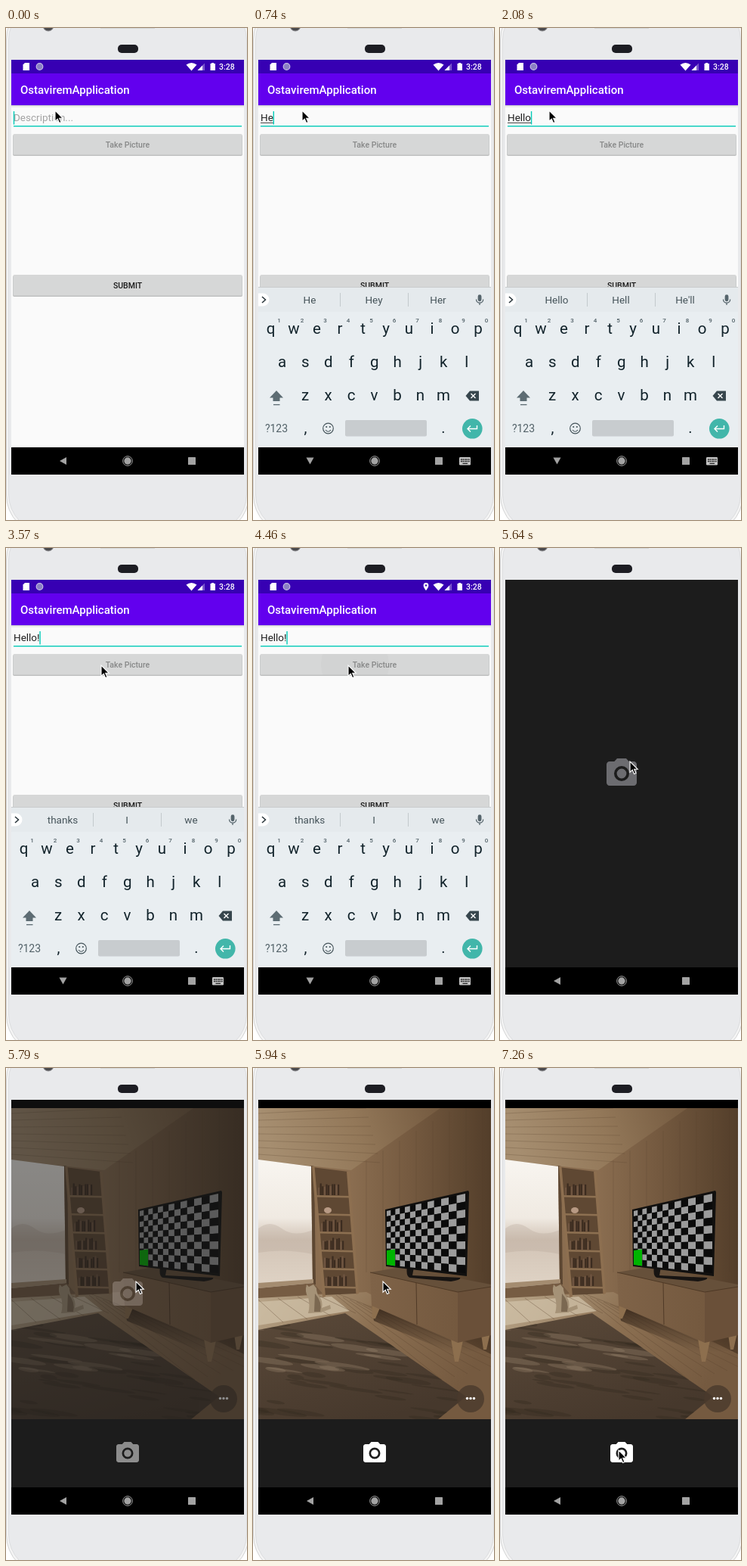
These frames come from a looping animation (319 by 650 pixels, 8000 ms). An HTML page:

```html
<!DOCTYPE html>
<html lang="en">
<head>
<meta charset="utf-8">
<title>Phone demo</title>
<style>
html, body { margin: 0; width: 100%; height: 100%; overflow: hidden; background: #fff; }
svg { display: block; width: 100%; height: 100%; }
text { font-family: Roboto, sans-serif; }
.mid { text-anchor: middle; }
.med { font-weight: 500; }
</style>
</head>
<body>
<svg viewBox="0 0 319 650" xmlns="http://www.w3.org/2000/svg">
<defs>
  <path id="camera" fill-rule="evenodd" d="M9 2L7.17 4H4c-1.1 0-2 .9-2 2v12c0 1.1.9 2 2 2h16c1.1 0 2-.9 2-2V6c0-1.1-.9-2-2-2h-3.17L15 2zM12 7a5 5 0 1 1 0 10a5 5 0 1 1 0-10zM12 8.8a3.2 3.2 0 1 0 0 6.4a3.2 3.2 0 1 0 0-6.4z"/>
  <clipPath id="screen"><rect x="7" y="42" width="308" height="512"/></clipPath>
  <clipPath id="view"><rect x="7" y="53" width="308" height="411"/></clipPath>
  <clipPath id="rugClip"><path d="M7 346L122 324L282 434L245 464H7z"/></clipPath>
  <clipPath id="btnClip"><rect x="9.5" y="140" width="303" height="27.5"/></clipPath>
  <linearGradient id="wall"><stop offset=".4" stop-color="#8a6d50"/><stop offset=".65" stop-color="#755a40"/><stop offset="1" stop-color="#533e2a"/></linearGradient>
  <linearGradient id="ceil" x2="1" y2="-.1"><stop offset="0" stop-color="#a68e70"/><stop offset=".5" stop-color="#937859"/><stop offset="1" stop-color="#73593f"/></linearGradient>
  <linearGradient id="sky" x2="0" y2="1"><stop offset="0" stop-color="#f8f5f0"/><stop offset=".45" stop-color="#f0eae2"/><stop offset=".62" stop-color="#d2c4b6"/><stop offset="1" stop-color="#e0d4c6"/></linearGradient>
  <linearGradient id="floor" x2="1" y2=".4"><stop offset="0" stop-color="#b9a68a"/><stop offset=".5" stop-color="#8c7052"/><stop offset="1" stop-color="#755a40"/></linearGradient>
  <linearGradient id="rugFill" x2=".6" y2="1"><stop offset="0" stop-color="#5a4939"/><stop offset="1" stop-color="#46382c"/></linearGradient>
  <linearGradient id="front"><stop offset="0" stop-color="#7f6348"/><stop offset="1" stop-color="#74593f"/></linearGradient>
  <linearGradient id="shadow" x2="0" y2="1"><stop offset="0" stop-color="#3a2a1d"/><stop offset="1" stop-color="#3a2a1d" stop-opacity="0"/></linearGradient>
</defs>

<rect width="319" height="650" fill="#fff"/>
<rect x=".5" y="-37" width="321" height="706" rx="52" fill="#f4f4f4" stroke="#d2d3d4"/>
<rect x="3.5" y="-34" width="315" height="700" rx="50" fill="#e9eaec" stroke="#dcdddf"/>
<circle cx="56" cy="-3" r="7" fill="#4a4a4d" stroke="#8c8c90"/>
<rect x="125" y="-3" width="72" height="4" fill="#d3d5d6"/>
<rect x="148" y="22" width="27" height="11" rx="5" fill="#1d1d23"/>

<g id="app">
  <rect x="7" y="42" width="308" height="512" fill="#fafafa"/>
  <rect x="7" y="102" width="308" height="1.5" fill="#d0d0d2"/>
  <rect x="7" y="103.5" width="308" height="1.5" fill="#efeff0"/>
  <rect x="7" y="60" width="308" height="42" fill="#6200ee"/>
  <rect x="7" y="42" width="308" height="18" fill="#3700b3"/>
  <text class="med" x="19" y="87" font-size="15" fill="#fff">OstaviremApplication</text>
  <rect x="10" y="129" width="302" height="1.4" fill="#03cbb8"/>
  <text id="field" x="10" y="123.4" font-size="13.5"></text>
  <rect id="under" x="10" y="124.8" height=".9" fill="#222"/>
  <rect id="caret" y="110" width="1.4" height="17.5" fill="#03cbb8"/>
  <g id="buttons"></g>
  <circle id="ripple" cx="135" cy="154" r="45" fill="#000" opacity=".02" clip-path="url(#btnClip)"/>
  <text class="mid med" x="161" y="157.6" font-size="10.5" fill="#878888">Take Picture</text>
  <text class="mid med" x="161" y="343.6" font-size="10.5" fill="#1b1b1b">SUBMIT</text>
</g>

<g id="camApp" clip-path="url(#screen)">
  <g id="preview">
    <rect x="7" y="42" width="308" height="512" fill="#000"/>
    <g clip-path="url(#view)">
      <rect x="7" y="53" width="308" height="411" fill="url(#wall)"/>
      <path d="M7 53H248L130 135L7 122z" fill="url(#ceil)"/>
      <g id="planks" stroke="#553f2b" stroke-width=".7" opacity=".35"></g>
      <path d="M7 121L77 130L79 285L7 292z" fill="url(#sky)"/>
      <path d="M7 212Q22 200 38 212T79 214V246Q42 238 7 244z" fill="#b3a496" opacity=".3"/>
      <path d="M77 129L81 130L83 286L79 287z" fill="#5d4732"/>
      <path d="M7 284L80 279V284L7 291z" fill="#a48c70"/>
      <path d="M7 291L80 284L92 298L7 306z" fill="#765c43"/>
      <path d="M7 304L150 296L315 378V464H7z" fill="url(#floor)"/>
      <path d="M7 309L104 302L128 321L7 340z" fill="#d0c2a9" opacity=".75"/>
      <g id="boards" stroke="#5c442f" stroke-width=".8" opacity=".45"></g>
      <path d="M78 131L126 137L137 298L94 300z" fill="#5f4833"/>
      <g id="shelves"></g>
      <path d="M78 130L81.500 130L96 302L92 303zM124 137L128 137L140 298L136.500 299z" fill="#8d6f50"/>
      <ellipse cx="99" cy="188" rx="5" ry="4" fill="#b89a84"/>
      <path d="M71 286L74 289L80 286L84 291Q84 298 88 302Q93 309 91 317L102 313L103 318L90 323L73 324Q76 314 73 303Q68 296 71 286z" fill="#a59277"/>
      <path d="M82 298Q92 309 89 322H81z" fill="#7b6851"/>
      <path d="M7 346L122 324L282 434L245 464H7z" fill="url(#rugFill)"/>
      <g id="streaks" clip-path="url(#rugClip)"></g>
      <path d="M157 312L271 360L313 350L315 374L262 376L160 334z" fill="url(#shadow)"/>
      <path d="M157 312L168 317L162 331L158 331zM262 358L278 360L272 388L267 388zM302 352L314 350L309 372L305 372z" fill="#8d6f4e"/>
      <path d="M155 270L196 263L315 286V294L271 297z" fill="#66503a"/>
      <path d="M155 270L271 296V363L157 314z" fill="url(#front)"/>
      <path d="M271 296L315 289V353L271 363z" fill="#6a5039"/>
      <path d="M216 284L217 339M155 270L271 296L315 289" fill="none" stroke="#4b3623" stroke-width=".9"/>
      <path d="M204 262L213 263L211 274L274 277Q276 280 262 282L208 277Q202 276 204 262z" fill="#171412"/>
      <path d="M175 187L285 162L286 164L283 275L176 262z" fill="#11100f"/>
      <g id="checker"></g>
      <path d="M177 241L188 239.500V261.500L177 260z" fill="#00b400"/>
      <circle cx="288" cy="437" r="18" fill="#4a3a2c" opacity=".8"/>
      <g fill="#fff"><circle cx="283.500" cy="436.500" r="1.700"/><circle cx="288" cy="436.500" r="1.700"/><circle cx="292.500" cy="436.500" r="1.700"/></g>
    </g>
    <rect x="7" y="464" width="308" height="90" fill="#1c1c1c"/>
    <use href="#camera" transform="translate(143 491) scale(1.5)" fill="#fff"/>
  </g>
  <g id="cover">
    <rect id="shade" x="7" y="42" width="308" height="520" fill="#1c1c1c"/>
    <use href="#camera" transform="translate(137 274) scale(2)" fill="#6c6c70"/>
  </g>
</g>

<g id="status" fill="#fff">
  <path d="M25 46H31V56H22.500V48.500z"/>
  <circle cx="44.500" cy="51" r="4.300" fill="#8a80c4" stroke="#c4bfe4" stroke-width="1.200"/>
  <path id="pin" d="M229 46a3.400 3.400 0 0 1 3.400 3.400C232.400 52 229 56 229 56S225.600 52 225.600 49.400A3.400 3.400 0 0 1 229 46zm0 2.200a1.200 1.200 0 1 0 0 2.400a1.200 1.200 0 1 0 0-2.400z"/>
  <path d="M238.500 48.500Q245.500 43.500 252.500 48.500L245.500 56.500z"/>
  <path d="M263 46.500V56H253.500z" opacity=".35"/><path d="M260 49.500V56H253.500z"/>
  <path d="M272 46H275V47H277V56H270.500V47H272z"/>
  <text class="med" x="282" y="55" font-size="10.500">3:28</text>
</g>

<g clip-path="url(#screen)">
<g id="keyboard">
  <rect x="7" y="342" width="308" height="1" fill="#c9cccd"/>
  <rect x="7" y="343" width="308" height="211" fill="#e9eef1"/>
  <rect x="7" y="343" width="308" height="32" fill="#e5eaed"/>
  <path d="M7 350.500H13a8.500 8.500 0 0 1 0 17H7z" fill="#fff"/>
  <path d="M12 355L16.500 359L12 363" fill="none" stroke="#263238" stroke-width="1.500"/>
  <path d="M115.500 350V368M205.500 350V368" stroke="#c3c9cc"/>
  <g id="hints" class="mid" font-size="13.500" fill="#46545a"></g>
  <g fill="none" stroke="#55646b" stroke-width="1.300"><rect x="298.300" y="353" width="3.500" height="7.500" rx="1.700" fill="#55646b"/><path d="M295.500 358.500a4.600 4.600 0 0 0 9.200 0M300 363V366"/></g>
  <g id="keys" class="mid" fill="#12232b"></g>
  <g id="small" class="mid" fill="#526168"></g>
  <path d="M31 479L40 488.500H35.500V493H26.500V488.500H22z" fill="#5d6c73"/>
  <rect x="27" y="497" width="8.500" height="1.300" fill="#5d6c73"/>
  <path d="M287 479.500H299V492.500H287L281.500 486z" fill="#37464d"/>
  <path d="M288.500 483L294.500 489M294.500 483L288.500 489" stroke="#fff" stroke-width="1.400"/>
  <g fill="none" stroke="#45545b" stroke-width="1.200"><circle cx="99.500" cy="529" r="6.800"/><path d="M96 531Q99.500 535.500 103 531"/></g>
  <circle cx="97.200" cy="527" r="1.100" fill="#45545b"/><circle cx="101.800" cy="527" r="1.100" fill="#45545b"/>
  <rect x="122" y="518" width="108" height="21.500" rx="2" fill="#c8cccf"/>
  <circle cx="290.300" cy="529.300" r="13.300" fill="#42b6aa"/>
  <path d="M296.500 525V529.500H284.500M288 525.500L284 529.500L288 533.500" fill="none" stroke="#fff" stroke-width="1.400"/>
</g>
</g>

<g fill="#a3a3a3">
  <rect x="7" y="554" width="308" height="36" fill="#000"/>
  <path id="back" d="M71 572L80 567V577z"/>
  <circle cx="161" cy="572" r="6.300" fill="none" stroke="#a3a3a3"/><circle cx="161" cy="572" r="4.700"/>
  <rect x="241" y="567" width="10" height="10" rx=".6"/>
  <g id="kbIcon"><rect x="273" y="567" width="15" height="10.500" rx="1.200" fill="#c5c5c5"/>
  <path d="M275 570H286.500M275 572.500H286.500" stroke="#000" stroke-width="1.300" stroke-dasharray="1.500 1"/><path d="M277.500 575.300H284" stroke="#000"/></g>
</g>

<path id="mouse" d="M0 0V14.200L3.300 11.200L5.600 16.500L8 15.400L5.700 10.300H10.300z" fill="#000" stroke="#fff" stroke-width="1.100"/>
</svg>
<script>
const LOOP = 8000;
const $ = id => document.getElementById(id);
const fill = (id, html) => { $(id).innerHTML = html; };
const times = (n, f) => Array.from({ length: n }, (_, i) => f(i)).join('');
const label = (x, y, s, size) => `<text x="${x}" y="${y}" font-size="${size}">${s}</text>`;
const line = (x1, y1, x2, y2) => `<path d="M${x1} ${y1}L${x2} ${y2}"/>`;
const mix = (a, b, k) => a + (b - a) * k;

let seed = 7;
const rand = () => (seed = seed * 16807 % 2147483647) / 2147483647;

fill('buttons', [140, 326].map(y =>
  `<rect x="9" y="${y + 1}" width="304" height="28" rx="2" fill="#bfc0c0"/>
   <rect x="9.5" y="${y}" width="303" height="27.5" rx="1.5" fill="#d6d7d7"/>`).join(''));

// Keyboard
const PITCH = 30.5;
const row = (s, x, y) => [...s].map((c, i) => label(x + i * PITCH, y, c, 20.5)).join('');
fill('keys',
  row('qwertyuiop', 23.5, 404) + row('asdfghjkl', 38.7, 447.5) + row('zxcvbnm', 69, 492) +
  label(69.5, 535, ',', 20) + label(252, 535, '.', 20));
fill('small',
  label(31, 533.5, '?123', 14) +
  `<g class="med">${times(10, i => label(34.5 + i * PITCH, 389, (i + 1) % 10, 8))}</g>`);

// Room seen by the camera
fill('planks',
  times(7, i => line(7, 60 + i * 9, 150 + i * 3, 53 + i * 12)) +
  times(8, i => line(150 + i * 22, 122 - i * 13, 150 + i * 22, 270)));
fill('boards',
  times(5, i => line(7 + i * 26, 306 - i * 2, 40 + i * 32, 336 - i * 4)) +
  times(7, i => line(110 + i * 9, 300 + i * 3, 250 + i * 17, 412 - i * 4)));
fill('shelves', times(6, i => {
  const y = 168 + i * 24, x = 82 + i * 2, w = 46 - i * .3;
  const books = times(11, j => {
    const h = 10 + rand() * 6;
    return `<rect x="${x + 4 + j * 2.6}" y="${y - h}" width="2.2" height="${h}" fill="${j % 3 ? '#3c2c20' : '#6f5541'}"/>`;
  });
  return (i === 1 ? '' : books) + `<path d="M${x} ${y}L${x + w} ${y + 1}V${y + 3.5}L${x} ${y + 2.5}z" fill="#8d7051"/>`;
}));
fill('streaks', times(60, i => {
  const light = i % 3 === 0;
  const x = rand() * 270, y = (light ? 325 : 335) + rand() * (light ? 80 : 130), w = 10 + rand() * 28;
  return `<ellipse cx="${x}" cy="${y}" rx="${w}" ry="${1 + rand() * 3}" transform="rotate(8 ${x} ${y})" fill="${light ? '#94806a' : '#33281f'}" opacity=".35"/>`;
}));

// Test pattern on the slanted TV, columns narrowing with distance
const COLS = 13, ROWS = 10;
const onTv = (u, v) => {
  const s = u * 71 / (105 * (1 - u) + 71 * u);
  return `${mix(177, 281, s).toFixed(1)} ${mix(mix(189, 166, s), mix(260, 271, s), v).toFixed(1)}`;
};
fill('checker', times(COLS * ROWS, i => {
  const c = i % COLS, r = Math.floor(i / COLS);
  const p = (a, b) => onTv((c + a) / COLS, (r + b) / ROWS);
  return `<path d="M${p(0, 0)}L${p(1, 0)}L${p(1, 1)}L${p(0, 1)}z" fill="${(c + r) % 2 ? '#0b0b0b' : '#9b9b9b'}"/>`;
}));

// Timeline: each entry holds until the next one
const typed = [[0, ''], [590, 'H'], [740, 'He'], [890, 'Hell'], [1190, 'Hello'], [2670, 'Hello!']];
const words = {
  '': ['I', 'The', "I'm"], H: ['H', 'Hey', 'Hi'], He: ['He', 'Hey', 'Her'], Hell: ['Hell', 'Hello', 'Help'],
  Hello: ['Hello', 'Hell', "He'll"], 'Hello!': ['thanks', 'I', 'we']
};
const pointer = [
  [0, 65, 109], [2970, 78, 121], [3120, 108, 143], [3270, 126, 155],
  [5340, 134, 185], [5490, 160, 250], [5640, 172, 282],
  [6230, 168, 322], [6370, 162, 368], [6520, 157, 416], [6670, 154, 456],
  [6820, 153, 485], [6960, 154, 499], [7110, 156, 504], [7260, 157, 505]
];
const lift = [[0, 211], [300, 90], [450, 0], [5340, 211]];
const at = (list, t) => list.filter(k => k[0] <= t).pop();
const within = (t, a, b) => t >= a && t < b;
const show = (id, on) => $(id).setAttribute('visibility', on ? 'visible' : 'hidden');
const move = (id, x, y) => $(id).setAttribute('transform', `translate(${x} ${y})`);

let shown;
function setText(s) {
  if (s === shown) return;
  shown = s;
  const field = $('field');
  field.textContent = s || 'Description...';
  field.setAttribute('fill', s ? '#1f1f1f' : '#a3a3a3');
  const w = s ? field.getComputedTextLength() : 0;
  $('caret').setAttribute('x', 9.8 + w);
  $('under').setAttribute('width', s.endsWith('!') ? 0 : w);
  fill('hints', words[s].map((h, i) => label(75 + i * 85, 364, h, 13.5)).join(''));
}

function draw(t) {
  setText(at(typed, t)[1]);
  show('caret', !within(t, 1630, 2080) && !within(t, 3120, 3570));
  show('ripple', t >= 4010);
  show('pin', within(t, 4460, 4900));
  show('status', t < 4900);

  const entering = t < 4900;
  show('camApp', t >= 4750);
  show('cover', within(t, 4750, 5940));
  show('preview', t >= 5790);
  move('cover', 0, entering ? 5 : 0);
  $('shade').setAttribute('opacity', entering ? .98 : 1);
  $('cover').setAttribute('opacity', t >= 5790 ? .5 : 1);

  const kb = within(t, 300, 5340);
  show('keyboard', kb);
  show('kbIcon', kb);
  move('keyboard', 0, at(lift, t)[1]);
  $('back').setAttribute('transform', kb ? 'rotate(-90 75.5 572)' : '');

  const [, x, y] = at(pointer, t);
  move('mouse', x, y);
}

let start;
function tick(now) {
  start ??= now;
  draw((now - start) % LOOP);
  requestAnimationFrame(tick);
}
draw(0);
requestAnimationFrame(tick);
</script>
</body>
</html>
```
